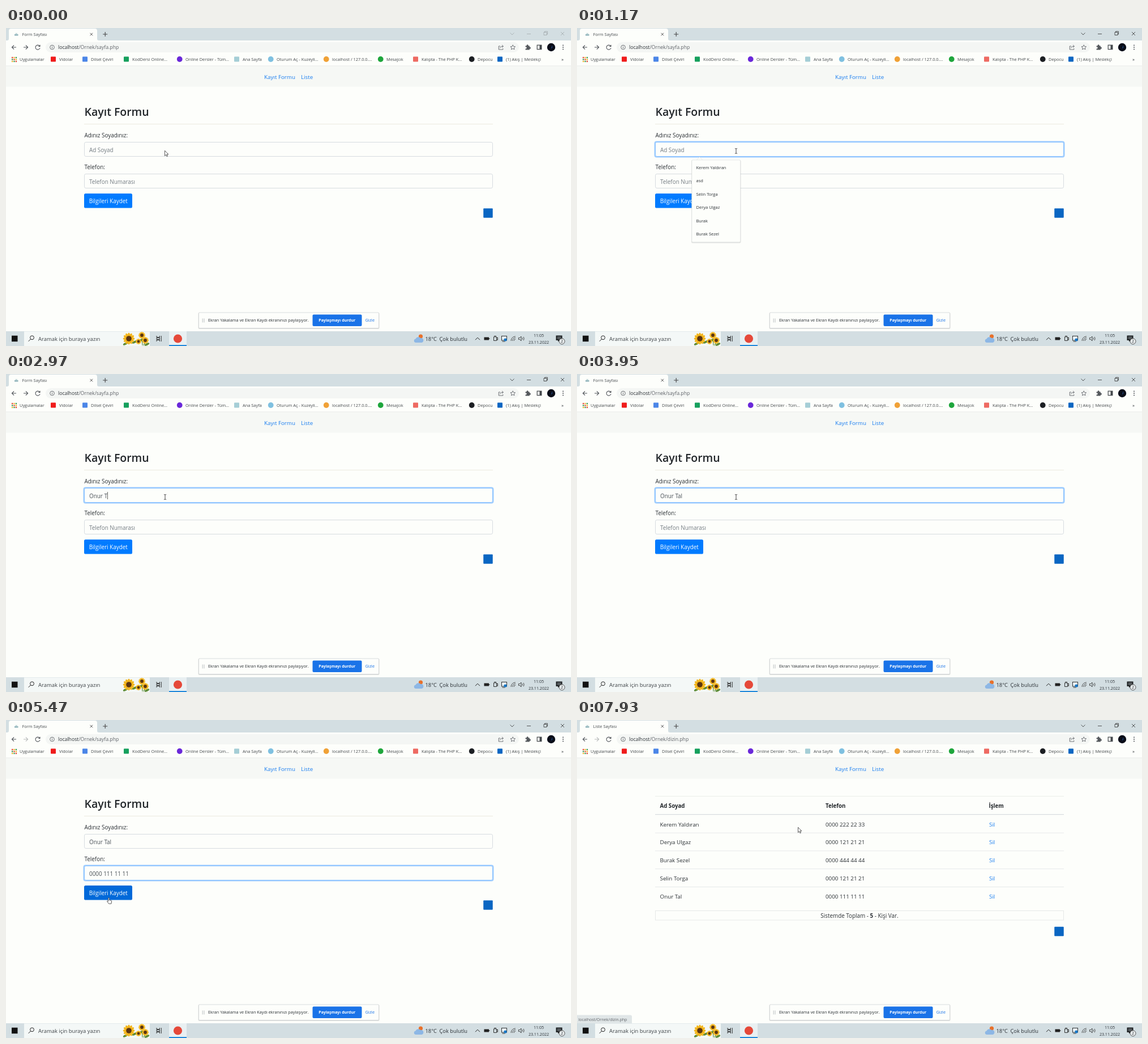
Write an HTML page that moves like this. It is 998 by 561 pixels and loops after 7990 ms.

```html
<!DOCTYPE html>
<html lang="tr">
<head>
<meta charset="utf-8">
<title>Form Sayfası</title>
<style>
  html, body { margin: 0; width: 100%; height: 100%; overflow: hidden; background: #fdfefb; }
  svg { display: block; width: 100vw; height: 100vh; }
  text { font-family: "Open Sans", "Noto Sans", sans-serif; white-space: pre; }
</style>
</head>
<body>
<svg id="stage" viewBox="0 0 998 561"></svg>
<script>
const LOOP = 7990;
const PAPER = '#fdfefb', BAR = '#d3dee2', INK = '#2b3035', GREY = '#5f6368', LINK = '#1a7df0';
const NAME = 'Onur Tal', PHONE = '0000 111 11 11';
const HOST = 'localhost', FORM_PATH = '/Ornek/sayfa.php', LIST_PATH = '/Ornek/dizin.php';

// SVG string helpers
const text = (x, y, size, str, fill = INK, extra = '') =>
  `<text x="${x}" y="${y}" font-size="${size}" fill="${fill}" ${extra}>${str}</text>`;
const rect = (x, y, w, h, fill, extra = '') =>
  `<rect x="${x}" y="${y}" width="${w}" height="${h}" fill="${fill}" ${extra}/>`;
const circle = (x, y, r, fill, extra = '') =>
  `<circle cx="${x}" cy="${y}" r="${r}" fill="${fill}" ${extra}/>`;
const line = (d, stroke = GREY, width = 1) =>
  `<path d="${d}" fill="none" stroke="${stroke}" stroke-width="${width}"/>`;
const group = (id, body) => `<g id="${id}">${body}</g>`;
const square = (x, y, s, fill) => rect(x - s / 2, y - s / 2, s, s, fill, 'rx="1"');
const MIDDLE = 'text-anchor="middle"', BOLD = 'font-weight="700"';

const flower = (x, y, r) => {
  let petals = '';
  for (let a = 0; a < 360; a += 30)
    petals += `<ellipse cx="${r * .65}" rx="${r * .38}" ry="${r * .2}" fill="#f3b51b" transform="rotate(${a})"/>`;
  return `<g transform="translate(${x} ${y})">${petals}${circle(0, 0, r * .48, '#5b3513')}</g>`;
};
const leaf = (x, y) =>
  `<ellipse cx="${x}" cy="${y}" rx="4.5" ry="2" fill="#5e8b35" transform="rotate(-25 ${x} ${y})"/>`;

function windowFrame() {
  const controls = line('M890.5 8.5l3.5 3.5 3.5-3.5M920 10.5h7M950 7.5h5v5h-5zM951.5 7.5v-1.5h5v5h-1.5M980 7l6 6m0-6l-6 6', '#333', .8);
  return rect(0, 0, 998, 22, BAR) +
    `<path d="M2 22q3 0 3-3V5q0-4 4-4h148q4 0 4 4v14q0 3 3 3z" fill="${PAPER}"/>` +
    rect(15, 11, 6.5, 2.5, '#8fb3ba') + rect(16.5, 9, 3.5, 1.5, '#b4cdd0') +
    `<text id="tabTitle" x="28.5" y="13.7" font-size="7.4" fill="#4a4e52"></text>` +
    line('M148.5 8.8l4.6 4.6m0-4.6l-4.6 4.6', '#444', .9) +
    line('M171.2 11h8M175.2 7v8', '#444', 1.1) + group('controls', controls);
}

function toolbar() {
  const puzzle = '<path d="M917.5 31.5h2.2a1.6 1.6 0 1 1 2.8 0h2.3v2.3a1.5 1.5 0 1 1 0 2.8v2h-7.3v-2.4a1.5 1.5 0 1 0 0-2.6z" fill="#54585c"/>';
  return rect(70, 25, 836, 18, '#f4f6f4', 'rx="9"') +
    line('M18 34h-7.5m3.6-3.7l-3.7 3.7 3.7 3.7', '#50545a', 1.1) +
    group('forward', line('M31 34h7.5m-3.6-3.7l3.7 3.7-3.7 3.7', '#50545a', 1.1)) +
    line('M59.2 31.6a4 4 0 1 0 .8 3.4M60 29.8v2.6h-2.7', '#50545a', 1.1) +
    circle(81.5, 34, 3.8, 'none', `stroke="${GREY}" stroke-width=".9"`) +
    line('M81.5 33.3v2.8M81.5 31.6v1', GREY, .9) +
    `<text x="92" y="37.3" font-size="8.7" fill="${INK}">${HOST}<tspan id="path" fill="${GREY}"></tspan></text>` +
    line('M873 32h-2.7v6h7.5v-2M872.4 35.5q.6-3 5.6-3.2m-1.9-2.3l2.4 2.3-2.4 2.2', GREY, .9) +
    line('M895.3 29.8l1.3 2.8 3 .3-2.2 2 .6 3-2.7-1.5-2.7 1.5.6-3-2.2-2 3-.3z', GREY, .9) + puzzle +
    rect(938.2, 30.2, 7.6, 7.4, 'none', 'stroke="#44484c" stroke-width="1.2"') + rect(942.5, 30, 3.6, 8, '#44484c') +
    circle(963, 34, 7.2, '#090d18') + '<path d="M962.5 37l2.2-6 .6 3z" fill="#254b86"/>' +
    [30.6, 34, 37.4].map(y => circle(984, y, 1, '#50545a')).join('');
}

function bookmarks() {
  const items = [
    [24, 'Uygulamalar'], [94, 'Vidolar', '#f01c1c', 1], [150, 'Dilsel Çeviri', '#4c86e8', 1],
    [223, 'KodDersi Online...', '#16a05d', 1], [317, 'Online Dersler - Tüm...', '#6a28d9'],
    [418, 'Ana Sayfa', '#a5ced6', 1], [478, 'Oturum Aç - Kuzeyli...', '#7fc0e0'],
    [576, 'localhost / 127.0.0....', '#f0a136'], [672, 'Mesajcık', '#1ea63c'],
    [734, 'Kalıpta - The PHP K...', '#ee6a62', 1], [833, 'Depocu', '#1c1f23'],
    [883, '(1) Akış | Meslekçi', '#0a66c2', 1]];
  const colours = ['#e5493a', '#f2b52c', '#3c9d58'];
  let out = '';
  for (let i = 0; i < 9; i++) {
    const col = i % 3, row = Math.floor(i / 3);
    out += rect(10 + col * 3.4, 51 + row * 3.4, 2.3, 2.3, colours[(col + 2 * row) % 3]);
  }
  for (const [x, label, colour, isSquare] of items) {
    if (colour) out += isSquare ? square(x - 10.5, 55, 9, colour) : circle(x - 10.3, 55, 4.9, colour);
    out += text(x, 57.8, 7.4, label, '#44484c');
  }
  return out + text(981, 57.8, 8, '»') + rect(0, 66.5, 998, 1, '#e2e5e3');
}

const navigation = () => rect(0, 67.5, 998, 36, '#f6f8f5') +
  text(456, 89.5, 9.8, 'Kayıt Formu', LINK) +
  `<text id="listLink" x="521" y="89.5" font-size="9.8" fill="${LINK}">Liste</text>`;

const field = (id, y) =>
  rect(137.5, y - .5, 723, 27, 'none', `id="${id}Ring" rx="3" stroke="#9dccff" stroke-width="2"`) +
  rect(138.5, y + .5, 721, 25, PAPER, `id="${id}Box" rx="2.6" stroke="#d3d9de" stroke-width=".9"`) +
  `<text id="${id}" x="147" y="${y + 17.6}" font-size="9.9"></text>`;

function formPage() {
  const people = ['Kerem Yaldıran', 'asd', 'Selin Torga', 'Derya Ulgaz', 'Burak', 'Burak Sezel'];
  const menu = `<path d="M211 233l5.5-5.5 5.5 5.5" fill="${PAPER}" stroke="#d9dcdc" stroke-width=".6"/>` +
    rect(202, 233, 87.5, 146.5, '#000', 'rx="2" opacity=".1"') +
    rect(202.7, 232.8, 86, 145, PAPER, 'rx="2" stroke="#d4d8d9" stroke-width=".6"') +
    people.map((p, i) => text(210.5, 249 + i * 23.4, 7.5, p)).join('');
  return text(138.5, 155, 19.5, 'Kayıt Formu', '#212529', 'font-weight="600"') +
    rect(138, 169, 722, 1, '#eceadf') +
    text(138.5, 192.7, 9.9, 'Adınız Soyadınız:') + field('nameField', 201) +
    text(138.5, 248.7, 9.9, 'Telefon:') + field('phoneField', 257) +
    rect(138, 292, 85, 25.6, '#007bff', 'id="button" rx="2.6"') +
    text(180.7, 309, 9.9, 'Bilgileri Kaydet', '#fff', MIDDLE) +
    square(851.5, 326.5, 16.5, '#0a66c2') + group('menu', menu) +
    rect(0, 0, .8, 13, '#333', 'id="caret"');
}

function listPage() {
  const rows = [['Kerem Yaldıran', '0000 222 22 33'], ['Derya Ulgaz', '0000 121 21 21'],
    ['Burak Sezel', '0000 444 44 44'], ['Selin Torga', '0000 121 21 21'], [NAME, PHONE]];
  const heads = [[146.5, 'Ad Soyad'], [439, 'Telefon'], [727.5, 'İşlem']];
  return rect(138, 134, 722, .8, '#e8ebe6') +
    heads.map(([x, label]) => text(x, 154.7, 9.7, label, '#212529', BOLD)).join('') +
    rect(138, 166, 722, 1.3, '#d9dde0') +
    rows.map(([name, phone], i) => {
      const y = 187.5 + i * 31.8;
      return text(146.5, y, 9.8, name) + text(439, y, 9.8, phone) + text(728, y, 9.8, 'Sil', LINK) +
        (i < 4 ? rect(138, y + 11.2, 722, .8, '#e1e4e5') : '');
    }).join('') +
    rect(138.5, 336.5, 721, 16.5, 'none', 'stroke="#e4e7e6" stroke-width=".9"') +
    text(499, 349, 9.9, `Sistemde Toplam - <tspan ${BOLD}>5</tspan> - Kişi Var.`, INK, MIDDLE) +
    square(851.5, 373, 16.5, '#0a66c2');
}

const shareBar = () => rect(339.5, 502, 320, 29, '#000', 'rx="2" opacity=".13"') +
  rect(340.5, 502, 318, 27.5, PAPER, 'rx="1.5" stroke="#d0d4d6" stroke-width=".8"') +
  line('M347.2 512.5v7M350 512.5v7', '#b5b9bb', .9) +
  text(357, 518.3, 7.3, 'Ekran Yakalama ve Ekran Kaydı ekranınızı paylaşıyor.') +
  rect(541.5, 505.5, 87, 20.5, '#1a73e8', 'rx="2"') +
  text(584.7, 518.3, 6.9, 'Paylaşmayı durdur', '#fff', `${MIDDLE} ${BOLD}`) +
  text(634.5, 518.3, 7.3, 'Gizle', '#1a73e8');

function tray() {
  return circle(732.5, 544, 3.6, '#e8702a') +
    '<path d="M723.5 555a3.3 3.3 0 0 1 0-6.5a5 5 0 0 1 8.5-1.5a4 4 0 0 1 2.5 8z" fill="#8db7e5"/>' +
    text(740.5, 551.8, 9.3, '18°C') + text(765.5, 551.8, 9.3, 'Çok bulutlu') +
    line('M829 550.2l4-4 4 4', '#222') +
    rect(844.5, 545.5, 8.5, 5, '#222') + rect(853.3, 547, 1, 2, '#222') +
    line('M861.5 545h5v6.5h-5zM866.5 547l2-1v4.5l-2-1M862 543.5h4', '#222', .9) +
    rect(875.5, 543.5, 9, 7.5, '#eaf3f7', 'stroke="#222" stroke-width=".9"') + circle(882, 550, 2.6, '#1677c8') +
    line('M876.5 553h5', '#222', .9) +
    line('M892 552a8 8 0 0 1 8-8M894.5 552a5.5 5.5 0 0 1 5.5-5.5M897 552a3 3 0 0 1 3-3', '#444', .9) +
    line('M905.5 546.5h2l2.5-2.5v8l-2.5-2.5h-2z', '#222', .8) +
    line('M912 546.3q1.3 1.7 0 3.4M914 544.8q2.4 3.2 0 6.4', '#333', .8) +
    text(941, 544.8, 7.1, '11:05', INK, MIDDLE) + text(941, 557, 7.1, '23.11.2022', INK, MIDDLE) +
    '<path d="M971.5 542.5h11v8.5h-5l-2.5 2.5v-2.5h-3.5z" fill="#1b1e20"/>' +
    line('M973.5 545.3h7M973.5 548h7', BAR, .8) +
    circle(982, 552.7, 5, '#e9edee', 'stroke="#333" stroke-width=".8"') + text(982, 555.4, 7, '2', INK, MIDDLE);
}

function taskbar() {
  return rect(0, 535, 998, 26, BAR) + rect(10, 542.7, 10.5, 10.5, '#111') +
    rect(32, 535.5, 222, 25.5, '#f4f8f7') +
    circle(46, 546.3, 3.4, 'none', 'stroke="#222" stroke-width="1"') + line('M43.6 548.8l-4 4', '#222') +
    text(57, 551.5, 9.45, 'Aramak için buraya yazın', '#3c4145') +
    leaf(211, 557) + leaf(227, 554) + leaf(238, 551) + leaf(249, 558) +
    line('M240 545l1 15M247 552l-4 8', '#5e8b35', 1.2) +
    flower(217, 548, 10) + flower(240, 542, 6) + flower(234, 553, 5) + flower(246, 551, 6) +
    line('M266 543v2.5h5.5v-2.5M266 553v-2.5h5.5v2.5M266 546.7h5.5v2.6h-5.5zM274.3 543v10', '#222', .9) +
    rect(288, 535, 31, 26, '#e9f0f2') + rect(288, 559.3, 31, 1.7, '#0078d7') +
    circle(303.5, 548, 7.6, '#e5493a') + tray();
}

const pointers = () =>
  group('arrow', '<path d="M-.5-.7v9.2l2.1-2 1.5 3.2 1.4-.7-1.5-3.1h2.9z" fill="#fff" stroke="#333" stroke-width=".8"/>') +
  group('beam', line('M-2-4.5q2 0 2 1v7q0 1-2 1M2-4.5q-2 0-2 1M0 3.5q0 1 2 1', '#333', .9)) +
  group('hand', '<path d="M-.9 6.5v-5.6q0-1 .9-1t.9 1v3.3l3 .6q1.2.3 1.2 1.5l-.7 4.3h-4.4l-2.8-3.9q-.3-1.1.7-1z" fill="#fff" stroke="#333" stroke-width=".8"/>');

document.getElementById('stage').innerHTML =
  rect(0, 0, 998, 561, PAPER) + windowFrame() + toolbar() + bookmarks() + navigation() +
  group('formPage', formPage()) + group('listPage', listPage()) + shareBar() +
  group('status', '<path d="M0 520.5h94q3 0 3 3v11.5h-97z" fill="#e0e6e7"/>' +
    text(2.5, 530.6, 7.1, HOST + LIST_PATH, GREY)) +
  taskbar() + group('pointer', pointers());

const el = id => document.getElementById(id);
const set = (id, attrs) => { for (const k in attrs) el(id).setAttribute(k, attrs[k]); };
const show = (id, on) => set(id, { visibility: on ? 'inherit' : 'hidden' });
const clamp = v => Math.max(0, Math.min(1, v));

// Times of user actions, in ms
const ACTIVATE = 300, FOCUS_NAME = 500, FOCUS_PHONE = 4150, COMMIT = 5440, RESET = 5750;
const HOVER_LINK = 7390, OPEN_LIST = 7560;
const nameKeys = [1350, 1500, 1650, 1800, 2050, 2900, 3100, 3300];
const phoneKeys = [...PHONE].map((_, i) => 4250 + i * 50);
const track = [[0, 281, 217], [4950, 281, 217], [5380, 181.5, 313.5], [5950, 181.5, 313.5],
  [6700, 422, 208], [6860, 422, 208], [7430, 531, 87], [7600, 531, 87], [7900, 391, 190], [LOOP, 391, 190]];

function pointerAt(t) {
  const i = track.findIndex(k => k[0] > t);
  const [t0, x0, y0] = track[i - 1], [t1, x1, y1] = track[i];
  const p = (t - t0) / (t1 - t0), e = p * p * (3 - 2 * p);
  return [x0 + (x1 - x0) * e, y0 + (y1 - y0) * e];
}

function updateField(id, value, hint, ring) {
  el(id).textContent = value || hint;
  set(id, { fill: value ? '#495057' : '#747c83' });
  set(id + 'Ring', { opacity: ring });
  set(id + 'Box', { stroke: ring > .5 ? '#80bdff' : '#d3d9de' });
}

function draw(t) {
  const onList = t >= OPEN_LIST, filled = t < RESET;
  const typed = (str, keys) => filled ? str.slice(0, keys.filter(k => k <= t).length) : '';
  const name = typed(NAME, nameKeys), phone = typed(PHONE, phoneKeys);
  const fade = start => clamp((t - start) / 150);

  el('tabTitle').textContent = onList ? 'Liste Sayfası' : 'Form Sayfası';
  el('path').textContent = onList ? LIST_PATH : FORM_PATH;
  set('controls', { opacity: t < ACTIVATE ? .3 : 1 });
  set('forward', { opacity: t < COMMIT ? 1 : .4 });
  show('formPage', !onList);
  show('listPage', onList);
  show('status', t >= HOVER_LINK);
  show('menu', !onList && t >= FOCUS_NAME && t < nameKeys[0]);

  updateField('nameField', name, 'Ad Soyad', filled ? fade(FOCUS_NAME) - fade(FOCUS_PHONE) : 0);
  updateField('phoneField', phone, 'Telefon Numarası', filled ? fade(FOCUS_PHONE) : 0);

  const onPhone = t >= FOCUS_PHONE, id = onPhone ? 'phoneField' : 'nameField';
  const lastKey = Math.max(...[FOCUS_NAME, FOCUS_PHONE, ...nameKeys, ...phoneKeys].filter(k => k <= t));
  const value = onPhone ? phone : name;
  show('caret', t >= FOCUS_NAME && filled && (t - lastKey) % 1060 < 530);
  set('caret', { x: 147 + (value ? el(id).getComputedTextLength() : 0), y: onPhone ? 264 : 208 });

  const [x, y] = pointerAt(t);
  const within = (x0, y0, x1, y1) => x >= x0 && x <= x1 && y >= y0 && y <= y1;
  const onButton = !onList && within(138, 292, 223, 318);
  const onLink = within(519, 79, 544, 94);
  const onField = !onList && t >= ACTIVATE && (within(138, 202, 860, 227) || within(138, 258, 860, 282));
  const shape = onButton || onLink ? 'hand' : onField ? 'beam' : 'arrow';
  for (const s of ['arrow', 'beam', 'hand']) show(s, s === shape);
  set('pointer', { transform: `translate(${x} ${y})` });
  set('button', { fill: onButton ? '#0069d9' : '#007bff' });
  set('listLink', { fill: onLink ? '#0056b3' : LINK, 'text-decoration': onLink ? 'underline' : 'none' });
}

const start = performance.now();
function tick() {
  draw((performance.now() - start) % LOOP);
  requestAnimationFrame(tick);
}
tick();
</script>
</body>
</html>
```
